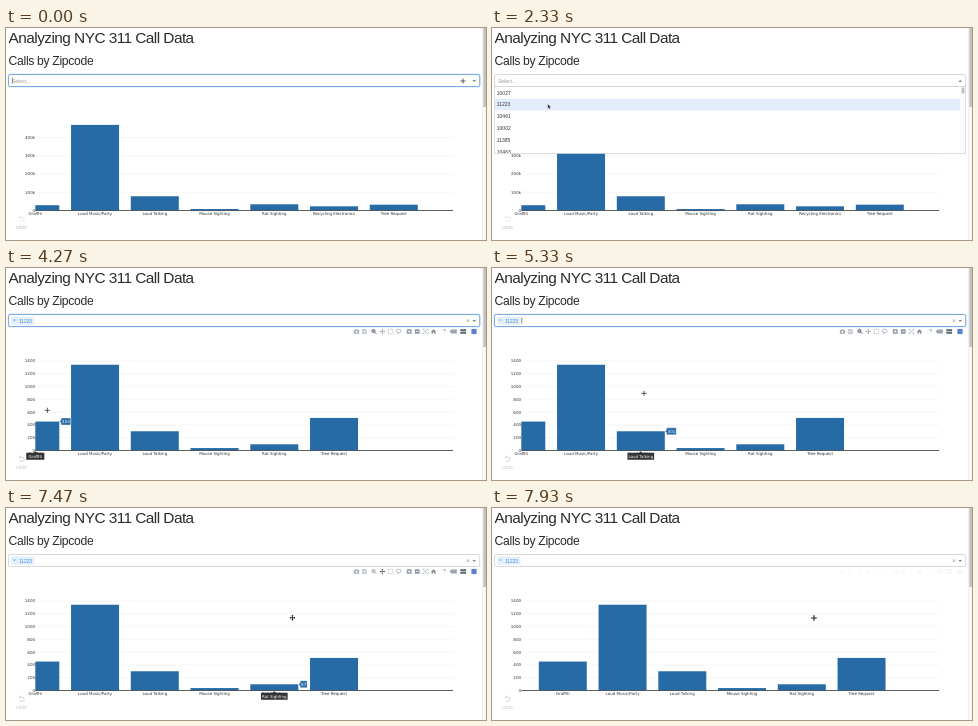
An HTML page that plays this animation: 480x212 px, repeating every 8000 ms.

```html
<!DOCTYPE html>
<html lang="en">
<head>
<meta charset="utf-8">
<title>Call data dashboard</title>
<style>
html, body { margin: 0; width: 100%; height: 100%; overflow: hidden; background: #fff; }
svg { display: block; width: 480px; height: 212px; font-family: "Liberation Sans", Arial, sans-serif; }
.chart { font: 4px "DejaVu Sans", Verdana, sans-serif; fill: #333; }
</style>
</head>
<body>
<svg id="stage" viewBox="0 0 480 212" xmlns="http://www.w3.org/2000/svg"></svg>
<script>
const LOOP = 8000, STEP = 1000 / 15;
const T = { open: 1400, pick: 3270, update: 4130, pan: 6850, drag: 7590 };
const BLUE = '#276ba6', BASE = 182.5, LEFT = 29.3, RIGHT = 447, PITCH = 59.75, BAR = 48;
const stage = document.getElementById('stage');

const before = {
  unit: 18.25, ticks: ['0', '100k', '200k', '300k', '400k'],
  names: ['Graffiti', 'Loud Music/Party', 'Loud Talking', 'Mouse Sighting', 'Rat Sighting', 'Recycling Electronics', 'Tree Request'],
  values: [29, 469, 78, 8, 34, 23, 32], scale: 0.1825, suffix: 'k'
};
const after = {
  unit: 12.78, ticks: [0, 200, 400, 600, 800, 1000, 1200, 1400],
  names: ['Graffiti', 'Loud Music/Party', 'Loud Talking', 'Mouse Sighting', 'Rat Sighting', 'Tree Request'],
  values: [453, 1342, 301, 38, 97, 510], scale: 0.0639, suffix: ''
};
const zips = ['10027', '11223', '10461', '10002', '11385', '10463'];

// time, x, y
const path = [
  [0, 457, 53], [200, 457, 53], [1000, 462, 55], [1200, 471, 55], [1850, 471, 55],
  [2330, 55.7, 76], [2500, 55.7, 76], [2800, 14, 72], [2980, 14, 72], [3130, 14.5, 72.5],
  [3250, 14.5, 72.5], [3600, 28, 81.3], [4130, 40, 130], [4330, 42, 148], [4800, 44, 158],
  [5000, 44, 158], [5330, 148, 126], [5470, 318, 100], [5600, 318, 100], [5800, 374, 66],
  [6530, 376, 64], [6850, 376, 64], [7200, 322, 92], [7470, 286, 110],
  [7600, 280.5, 110], [7730, 289, 110], [7930, 322, 110]
];

const clamp = (v, a, b) => Math.max(a, Math.min(b, v));
const ramp = (t, a, b) => clamp((t - a) / (b - a), 0, 1);
const rect = (x, y, w, h, fill, more = '') => `<rect x="${x}" y="${y}" width="${w}" height="${h}" fill="${fill}" ${more}/>`;
const text = (x, y, s, more = '') => `<text x="${x}" y="${y}" ${more}>${s}</text>`;
const fillPath = (d, fill, more = '') => `<path d="${d}" fill="${fill}" ${more}/>`;
const line = (d, stroke, w, more = '') => `<path d="${d}" fill="none" stroke="${stroke}" stroke-width="${w}" ${more}/>`;
const at = (x, y, s) => `<g transform="translate(${x} ${y})">${s}</g>`;

function pointer(t) {
  const i = path.findIndex(p => p[0] > t);
  if (i < 0) return path[path.length - 1].slice(1);
  const [a, b] = [path[i - 1], path[i]];
  const u = ramp(t, a[0], b[0]);
  return [a[1] + (b[1] - a[1]) * u, a[2] + (b[2] - a[2]) * u];
}

function caretOn(t) {
  if (t >= T.pan) return false;
  const since = t < T.pick ? t + 270 : t - T.pick;
  return since % 1000 < 500;
}

function header() {
  return text(2.6, 15.2, 'Analyzing NYC 311 Call Data', 'font-size="15.4" letter-spacing="-.55" fill="#2b2b2b"') +
    text(2.6, 37.2, 'Calls by Zipcode', 'font-size="12.2" letter-spacing="-.33" fill="#2b2b2b"') +
    rect(476.5, 0, 3.5, 212, '#f8f8f8') + line('M476.5 0V212', '#e6e6e6', 0.5) +
    rect(477.4, 0, 2.6, 79, '#c0c0c0');
}

function select(t, open) {
  const picked = t >= T.pick, focus = !open && t < T.pan;
  let s = '';
  if (focus) s += rect(2.5, 46.5, 471.2, 12, 'none', 'rx="1.8" stroke="#d9e7f8" stroke-width="2"');
  s += rect(2.5, 46.5, 471.2, 12, '#fff', `rx="1.8" stroke="${focus ? '#5f98dc' : '#cfcfcf'}" stroke-width=".8"`);
  if (picked) {
    s += rect(5.9, 49.1, 22, 7.2, '#e9f3ff', 'rx=".8" stroke="#c4dffc" stroke-width=".5"') +
      line('M11.2 49.1V56.3', '#c4dffc', 0.4) +
      text(7.1, 54.4, '×', 'font-size="4.8" fill="#2f83dd"') +
      text(13, 54.5, '11223', 'font-size="4.8" fill="#2f83dd"') +
      line('M460.6 51.4l2.6 2.6m0-2.6l-2.6 2.6', '#888', 0.6);
  } else {
    s += text(6, 54.6, 'Select...', 'font-size="5" fill="#999"');
  }
  s += fillPath(open ? 'M466.3 53.9h3.8l-1.9-2z' : 'M466.3 51.9h3.8l-1.9 2z', '#8a8a8a');
  if (caretOn(t)) s += line(`M${picked ? 29.8 : 6.4} 49.6V55.6`, '#333', 0.6);
  return s;
}

function menu(y) {
  const row = clamp(Math.floor((y - 58.8) / 11.8), 0, 5);
  const rows = zips.map((z, i) =>
    (i === row ? rect(3, 59 + i * 11.8, 465.3, 11.6, '#e3ecfb') : '') +
    text(4.8, 66.5 + i * 11.8, z, 'font-size="5" fill="#333"')).join('');
  return rect(2.5, 58.5, 471.2, 67, '#fff', 'stroke="#cfcfcf" stroke-width=".7"') +
    `<clipPath id="list"><rect x="3" y="59" width="470" height="66"/></clipPath><g clip-path="url(#list)">${rows}` +
    rect(468.4, 59, 5, 66, '#fafafa') + rect(469.6, 59.6, 2.8, 6, '#bfbfbf', 'rx="1.2"') + '</g>';
}

function tip(d, i) {
  const mid = LEFT + i * PITCH, edge = mid + BAR / 2 + 0.3;
  const y = BASE - d.values[i] * d.scale, v = d.values[i] + d.suffix;
  const w = v.length * 2.55 + 2, lw = d.names[i].length * 2.14 + 1;
  return fillPath(`M${edge} ${y}l1.5 -1.5v-2h${w}v7h${-w}v-2z`, BLUE, 'stroke="#fff" stroke-width=".4"') +
    text(edge + 2.5, y + 1.5, v, 'fill="#fff"') +
    fillPath(`M${mid} 183.2l1.7 1.6h${lw / 2 - 1.7}v7h${-lw}v-7h${lw / 2 - 1.7}z`, '#333') +
    text(mid, 189.8, d.names[i], 'fill="#fff" text-anchor="middle"');
}

function chart(d, shift, hover) {
  const ticks = d.ticks.map((v, i) => {
    const y = BASE - i * d.unit;
    return line(`M${LEFT} ${y}H${RIGHT}`, i ? '#eee' : '#555', i ? 0.5 : 0.7) +
      text(29, y + 1.4, v, 'text-anchor="end"');
  }).join('');
  const bars = d.values.map((v, i) =>
    rect(LEFT + i * PITCH - BAR / 2 + shift, BASE - v * d.scale, BAR, v * d.scale, BLUE)).join('');
  const names = d.names.map((n, i) =>
    text(LEFT + i * PITCH + shift, 186.8, n, 'text-anchor="middle"')).join('');
  return `<clipPath id="plot"><rect x="${LEFT}" y="75" width="${RIGHT - LEFT}" height="108"/></clipPath>` +
    `<g class="chart">${ticks}<g clip-path="url(#plot)">${bars}</g>` +
    line(`M${LEFT} ${BASE}H${RIGHT}`, '#444', 0.6) + names + (hover >= 0 ? tip(d, hover) : '') + '</g>';
}

function modebar(opacity, pan) {
  const off = '#a3aab5', on = '#5d6673';
  const z = pan ? off : on, p = pan ? on : off;
  const box = rect(-2.4, -2.3, 4.8, 4.6, '#8f98a8', 'rx=".5"');
  const icons = [
    [350.5, rect(-2.6, -1.6, 5.2, 3.8, off, 'rx=".5"') + rect(-1, -2.3, 2, 1, off) + '<circle r="1.1" cy=".3" fill="#fff"/>'],
    [358.3, line('M-2 -2h3.3l.9 .9v3.2h-4.2zM-1.1 -2v1.4h2v-1.4M-1.1 2v-1.5h2.3v1.5', off, 0.6)],
    [368, `<circle cx="-.5" cy="-.5" r="1.6" fill="${z}" fill-opacity=".5" stroke="${z}" stroke-width=".9"/>` + line('M.7 .7l1.7 1.7', z, 1)],
    [376.4, line('M-2.5 0h5M0 -2.5v5', p, 0.8) + fillPath('M-2.9 0l1.1-1v2zM2.9 0l-1.1-1v2zM0-2.9l-1 1.1h2zM0 2.9l-1-1.1h2z', p)],
    [384.5, rect(-2.3, -2.3, 4.6, 4.6, 'none', `stroke="${off}" stroke-width=".7" stroke-dasharray="1 .6"`)],
    [392.7, `<ellipse cy="-.5" rx="2.5" ry="1.7" fill="none" stroke="${off}" stroke-width=".7"/>` + line('M-1.3 .8q1.3 .5 .2 1.7', off, 0.7)],
    [403.2, box + line('M-1.3 0h2.6M0 -1.3v2.6', '#fff', 0.7)],
    [411.2, box + line('M-1.3 0h2.6', '#fff', 0.7)],
    [419.5, line('M-2.3 -2.3l4.6 4.6M2.3 -2.3l-4.6 4.6', off, 0.6) + line('M-2.4 -1.1v-1.3h1.3M1.1 -2.4h1.3v1.3M2.4 1.1v1.3h-1.3M-1.1 2.4h-1.3v-1.3', off, 0.6)],
    [427.5, fillPath('M-2.7 .2l2.7-2.5 2.7 2.5h-.8v2h-1.3v-1.5h-1.2v1.5h-1.3v-2z', '#858e9b')],
    [437.5, line('M-2 -1.7h3.5v3.5', off, 0.6, 'stroke-dasharray="1 .6"') + '<circle cx="1.5" cy="-1.7" r=".7" fill="#858e9b"/>'],
    [447.3, fillPath('M-3.7 0l1.8-2h5.4v4h-5.4z', '#9ca4b0')],
    [457.2, rect(-2.9, -2.3, 5.8, 2, on) + rect(-2.9, 0.3, 5.8, 2, on)],
    [468, rect(-2.6, -2.6, 5.2, 5.2, '#5b80cf')]
  ];
  return `<g opacity="${opacity}">${icons.map(([x, s]) => at(x, 63.5, s)).join('')}</g>`;
}

function undo(active) {
  return line('M13.4 189.2H16.2a2 2 0 0 1 0 4H13.6M14.6 187.8l-1.5 1.4 1.5 1.4', active ? '#c4c4c4' : '#dedede', 0.7) +
    text(10, 200.8, 'undo', `font-size="4.8" fill="${active ? '#c8c8c8' : '#bdbdbd'}"`);
}

const cursors = {
  cross: line('M-2.6 0h5.2M0 -2.6v5.2', '#222', 0.7),
  move: line('M-2.3 0h4.6M0 -2.3v4.6', '#222', 0.9) +
    fillPath('M-2.9 0l1.2-1.1v2.2zM2.9 0l-1.2-1.1v2.2zM0-2.9l-1.1 1.2h2.2zM0 2.9l-1.1-1.2h2.2z', '#222'),
  arrow: fillPath('M0 0v4.7l1.1-1 .8 1.8 .8-.4-.8-1.7h1.5z', '#111', 'stroke="#fff" stroke-width=".4"'),
  hand: fillPath('M-.6 -1.3q.6-.7 1 0v1.8l2 .5q.6 .3 .3 1.3l-.5 1.7h-2.7l-1.6-2.2q.1-.8 1 -.3l.5 .3z', '#fff', 'stroke="#222" stroke-width=".6"')
};

function draw(t) {
  const [x, y] = pointer(t);
  const open = t >= T.open && t < T.pick;
  const pan = t >= T.pan, dragging = t >= T.drag;
  const inPlot = t >= T.pick && x > LEFT && x < RIGHT && y > 75 && y < 183;
  const data = t < T.update ? before : after;
  let hover = inPlot && !dragging ? Math.round((x - LEFT) / PITCH) : -1;
  if (hover >= data.values.length) hover = -1;
  const shift = dragging ? x - 280.5 : 0;
  const bar = t < 7540 ? ramp(t, T.pick, 3530) : 1 - 0.94 * ramp(t, 7540, 7720);

  let kind = 'arrow';
  if (t < 1190) kind = 'cross';
  else if (t < 1860) kind = 'hand';
  else if (inPlot) kind = pan ? 'move' : 'cross';
  else if (t > 5700 && y < 70) kind = 'hand';

  let s = header() + chart(data, shift, hover) + undo(t >= T.update) + modebar(bar, pan) + select(t, open);
  if (open) s += menu(y);
  if (kind === 'hand' && t > 5700) {
    s += rect(371, 68.6, 10.5, 7, '#69738a', 'rx=".6"') +
      text(376.2, 73.6, 'Pan', 'font-size="4.2" fill="#fff" text-anchor="middle"');
  }
  stage.innerHTML = s + at(x, y, cursors[kind]);
}

const start = performance.now();
let last = -1;
function tick() {
  const n = Math.floor(((performance.now() - start) % LOOP + 4) / STEP);
  if (n !== last) draw((last = n) * STEP % LOOP);
  requestAnimationFrame(tick);
}
tick();
</script>
</body>
</html>
```
